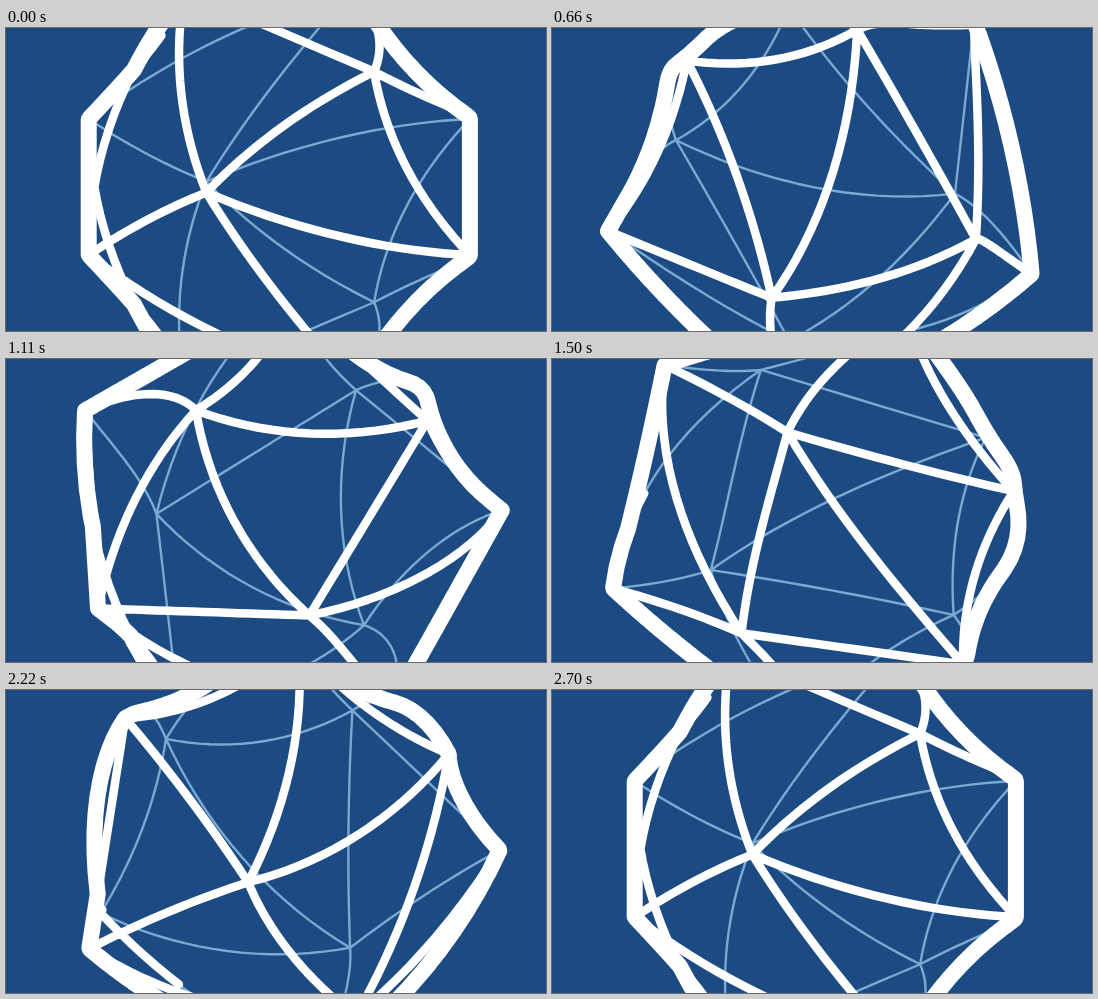
Write an HTML page with a canvas that moves like this. It is 540x303 px and loops after 2.73 s.

```html
<!DOCTYPE html>
<html lang="en">
<head>
<meta charset="utf-8">
<title>Twisting icosahedron</title>
<style>
  html, body { margin: 0; width: 100%; height: 100%; overflow: hidden; background: #1c4a82; }
  canvas { display: block; }
</style>
</head>
<body>
<canvas id="stage" width="540" height="303"></canvas>
<script>
const ctx = document.getElementById('stage').getContext('2d');
const CX = 273.3, CY = 159, SCALE = 117.8;
const STEP = 30, STEPS = 91;
const GRID = 12, CUTS = 18, RAYS = 720;
const PHI = (1 + Math.sqrt(5)) / 2;

const verts = [];
for (const a of [-1, 1]) for (const b of [-1, 1]) {
  verts.push([a * PHI, 0, b], [a, b * PHI, 0], [0, a, b * PHI]);
}

const near = (p, q) => Math.hypot(p[0] - q[0], p[1] - q[1], p[2] - q[2]) < 2.1;
const det = (p, q, r) =>
  p[0] * (q[1] * r[2] - q[2] * r[1]) -
  p[1] * (q[0] * r[2] - q[2] * r[0]) +
  p[2] * (q[0] * r[1] - q[1] * r[0]);
const lerp = (p, q, t) => p.map((v, i) => v + (q[i] - v) * t);
const cross = (p, q) => p[0] * q[1] - p[1] * q[0];
const sub = (p, q) => [p[0] - q[0], p[1] - q[1]];

const faces = [];
verts.forEach((p, i) => verts.forEach((q, j) => verts.forEach((r, k) => {
  if (i < j && j < k && near(p, q) && near(q, r) && near(p, r)) {
    faces.push(det(p, q, r) > 0 ? [p, q, r] : [p, r, q]);
  }
})));

// Spin the solid, twist it about the upright axis, tumble it, view isometrically.
function makeView(angle) {
  const c = Math.cos(angle), s = Math.sin(angle);
  return ([x, y, z]) => {
    const x1 = x * c - y * s, y1 = x * s + y * c;
    const twist = y1 * Math.PI / 8;
    const ct = Math.cos(twist), st = Math.sin(twist);
    const x2 = x1 * ct - z * st, z2 = x1 * st + z * ct;
    const n = (x2 + z2) * Math.SQRT1_2, m = (x2 - z2) * Math.SQRT1_2;
    const up = y1 * c - m * s, side = m * c + y1 * s;
    return [
      SCALE * (n + side) * Math.SQRT1_2,
      SCALE * ((n - side) / Math.sqrt(6) - up * Math.sqrt(2 / 3))
    ];
  };
}

// Farthest crossing of the surface mesh along each ray from the centre.
function silhouette(view) {
  const reach = new Float32Array(RAYS), unit = 2 * Math.PI / RAYS;
  const cast = (p, q) => {
    if (Math.hypot(...p) < 130 && Math.hypot(...q) < 130) return;
    const area = cross(p, q);
    if (area < 0) return cast(q, p);
    const from = Math.atan2(p[1], p[0]) / unit;
    let to = Math.atan2(q[1], q[0]) / unit;
    if (to < from) to += RAYS;
    const d = sub(q, p);
    for (let k = Math.ceil(from); k <= to; k++) {
      const r = area / cross([Math.cos(k * unit), Math.sin(k * unit)], d);
      const i = (k + RAYS) % RAYS;
      if (r > reach[i]) reach[i] = r;
    }
  };
  for (const [a, b, c] of faces) {
    let prev = null;
    for (let i = 0; i <= GRID; i++) {
      const row = [];
      for (let j = 0; j <= i; j++) {
        const u = (i - j) / GRID, v = j / GRID, w = 1 - i / GRID;
        row.push(view(a.map((_, n) => a[n] * w + b[n] * u + c[n] * v)));
        if (j) cast(row[j - 1], row[j]);
        if (prev && j < i) cast(prev[j], row[j]);
        if (prev && j) cast(prev[j - 1], row[j]);
      }
      prev = row;
    }
  }
  const path = new Path2D();
  reach.forEach((r, i) => path.lineTo(r * Math.cos(i * unit), r * Math.sin(i * unit)));
  path.closePath();
  return path;
}

function edgePaths(view) {
  const all = new Path2D(), front = new Path2D();
  for (const face of faces) for (let e = 0; e < 3; e++) {
    const p = face[e], q = face[(e + 1) % 3], r = face[(e + 2) % 3];
    let last = view(p), open = false;
    all.moveTo(...last);
    for (let i = 1; i <= CUTS; i++) {
      const next = view(lerp(p, q, i / CUTS));
      all.lineTo(...next);
      const t = (i - 0.5) / CUTS, mid = lerp(p, q, t);
      const o = view(mid);
      const along = sub(view(lerp(p, q, t + 0.01)), o);
      const inward = sub(view(lerp(mid, r, 0.01)), o);
      const facing = cross(along, inward) < 0;
      if (facing) {
        if (!open) front.moveTo(...last);
        front.lineTo(...next);
      }
      open = facing;
      last = next;
    }
  }
  return { all, front };
}

function stroke(path, color, width) {
  ctx.strokeStyle = color;
  ctx.lineWidth = width;
  ctx.stroke(path);
}

function draw(step) {
  const view = makeView(step * 2 * Math.PI / (STEPS - 1));
  const edges = edgePaths(view);
  ctx.setTransform(1, 0, 0, 1, 0, 0);
  ctx.fillStyle = '#1c4a82';
  ctx.fillRect(0, 0, 540, 303);
  ctx.translate(CX, CY);
  ctx.lineCap = ctx.lineJoin = 'round';
  stroke(edges.all, '#78aad2', 2.4);
  stroke(edges.front, '#fff', 8.5);
  stroke(silhouette(view), '#fff', 16);
}

const start = performance.now();
let shown = -1;
function tick() {
  const step = Math.floor(Math.max(0, performance.now() - start) / STEP) % STEPS;
  if (step !== shown) draw(shown = step);
  requestAnimationFrame(tick);
}
tick();
</script>
</body>
</html>
```
